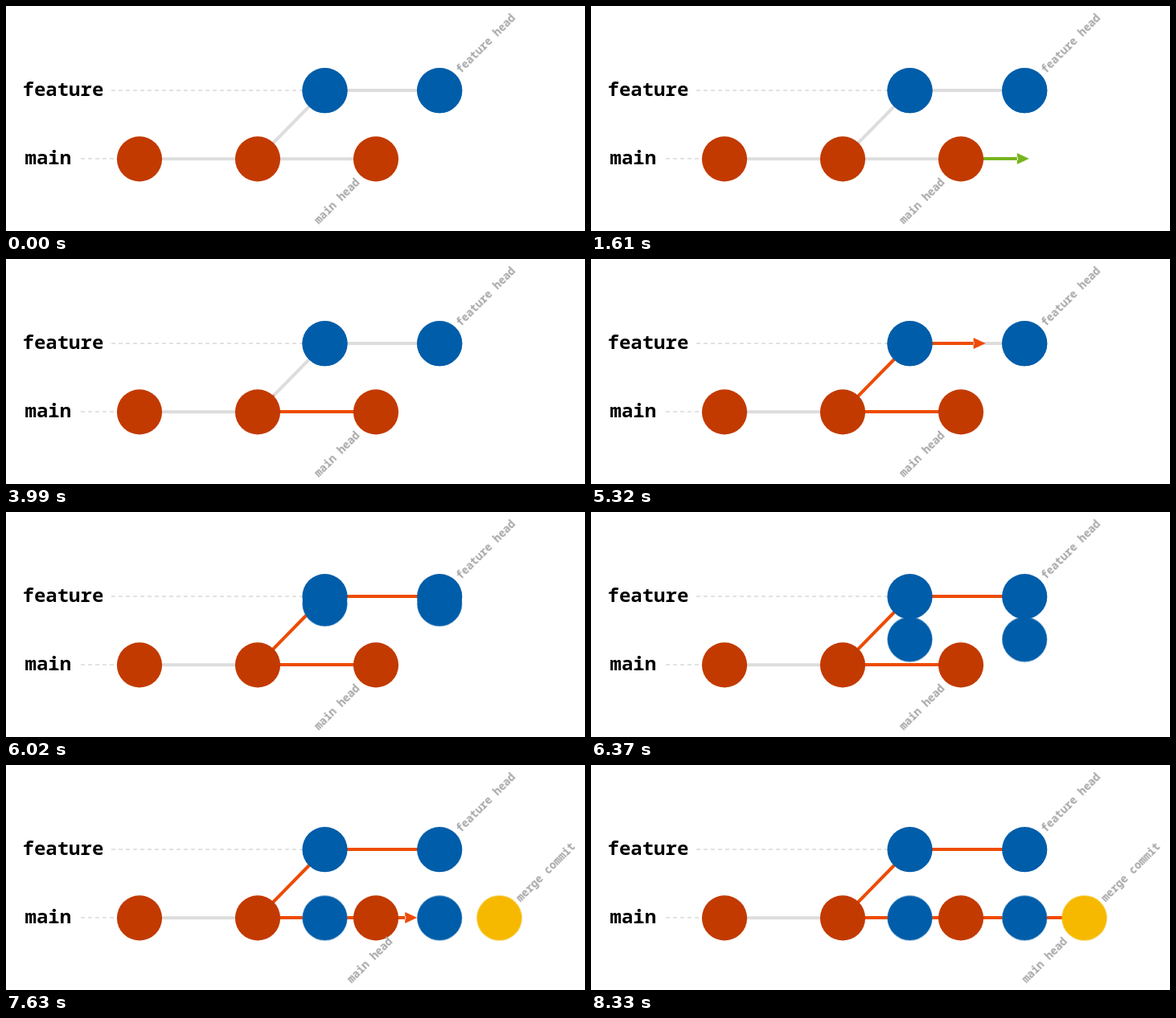
An HTML page for the animation above (8890 ms loop, 720x280 px).

```html
<!DOCTYPE html>
<html lang="en">
<head>
<meta charset="utf-8">
<title>Merging a feature branch</title>
<style>
  html, body { margin: 0; width: 100%; height: 100%; overflow: hidden; background: #fff; }
  body > svg { display: block; width: 720px; height: 280px; }

  text { font-family: "Noto Sans Mono", "DejaVu Sans Mono", monospace; }
  .branch { font-size: 24px; font-weight: 700; }
  .tag { font-size: 13.5px; font-weight: 600; fill: #a5a5a5; }
  .guide { stroke: #d9d9d9; stroke-width: 1.6; stroke-dasharray: 5 4; }
  .link { stroke: #ddd; stroke-width: 4; }
  .red { fill: #c23a00; }
  .blue { fill: #005da9; }
  .copy { stroke: #3f86c0; stroke-width: .5; }
  .yellow { fill: #f6b900; }
  .green { fill: #78b41e; }
  .orange { fill: #ee4b00; }

  /* One shared 8890 ms timeline, sought through --t */
  .anim { animation: 8890ms linear infinite paused both; animation-delay: calc(var(--t, 0) * -1ms); }
  .probe { animation-name: probe; }
  .main { animation-name: main; }
  .fork { animation-name: fork; }
  .feature { animation-name: feature; }
  .drop { animation-name: drop; }
  .merge { animation-name: merge; }
  .pop { animation-name: pop; }
  .show { animation-name: show; }
  .slide { animation-name: slide; }

  @keyframes probe {
    0% { transform: translateX(15px); }
    9.955% { transform: translateX(27px); animation-timing-function: cubic-bezier(.3, 0, .5, 1); }
    17.885% { transform: translateX(85px); animation-timing-function: ease-in-out; }
    23.285%, 100% { transform: translateX(15px); }
  }
  @keyframes main {
    0%, 32.34% { transform: translateX(28px); animation-timing-function: cubic-bezier(.4, 0, .4, 1); }
    40.1%, 100% { transform: translateX(136px); }
  }
  @keyframes fork {
    0%, 44.15% { transform: translateX(28px); animation-timing-function: cubic-bezier(.4, 0, .4, 1); }
    51.29%, 100% { transform: translateX(109px); }
  }
  @keyframes feature {
    0%, 55.96% { transform: translateX(28px); animation-timing-function: cubic-bezier(.4, 0, .4, 1); }
    63.72%, 100% { transform: translateX(131px); }
  }
  @keyframes drop {
    0%, 65.13% { transform: translateY(0); animation-timing-function: ease-in-out; }
    76.49%, 100% { transform: translateY(85.2px); }
  }
  @keyframes pop {
    0%, 76.38% { transform: scale(.3); opacity: 0; }
    82.68%, 100% { transform: scale(1); opacity: 1; }
  }
  @keyframes show {
    0%, 79.98% { opacity: 0; }
    84.93%, 100% { opacity: 1; }
  }
  @keyframes slide {
    0%, 81.55% { transform: translateX(0); animation-timing-function: ease-in-out; }
    93.48%, 100% { transform: translateX(152.5px); }
  }
  @keyframes merge {
    0%, 81.55% { transform: translateX(14px); animation-timing-function: ease-in-out; }
    93.48%, 100% { transform: translateX(153px); }
  }
</style>
</head>
<body>
<svg width="720" height="280" viewBox="0 0 720 280">
  <defs>
    <path id="arrow" d="M-200-2H-14V2H-200zM0 0L-15-7V7z"/>
    <circle id="dot" r="28.1"/>
  </defs>

  <text class="branch" x="20.5" y="111.5">feature</text>
  <text class="branch" x="23.5" y="197">main</text>
  <path class="guide" d="M131 105H368M93 190H138"/>
  <path class="link" fill="none" d="M166 190.2H460M313 190.2L396.5 105H539"/>

  <!-- Nested viewports clip each arrow's shaft at its starting commit -->
  <g transform="translate(460 190)">
    <svg y="-10" width="153" height="20" viewBox="0 -10 153 20">
      <use href="#arrow" class="anim green probe"/>
      <use href="#arrow" class="anim orange merge"/>
    </svg>
  </g>
  <g transform="translate(313 190)">
    <svg y="-10" width="147" height="20" viewBox="0 -10 147 20">
      <use href="#arrow" class="anim orange main"/>
    </svg>
  </g>
  <g transform="translate(313 190.2) rotate(-45.6)">
    <svg y="-10" width="119" height="20" viewBox="0 -10 119 20">
      <use href="#arrow" class="anim orange fork"/>
    </svg>
  </g>
  <g transform="translate(396.5 105)">
    <svg y="-10" width="142" height="20" viewBox="0 -10 142 20">
      <use href="#arrow" class="anim orange feature"/>
    </svg>
  </g>

  <g class="anim drop">
    <circle class="blue copy" cx="396.5" cy="105.2" r="27.8"/>
    <circle class="blue copy" cx="539.2" cy="105.2" r="27.8"/>
  </g>
  <g class="blue">
    <use href="#dot" x="396.5" y="105.2"/>
    <use href="#dot" x="539.2" y="105.2"/>
  </g>
  <g class="red">
    <use href="#dot" x="166" y="190.4"/>
    <use href="#dot" x="313" y="190.4"/>
    <use href="#dot" x="460" y="190.4"/>
  </g>
  <g transform="translate(613.5 190.4)">
    <use href="#dot" class="anim yellow pop"/>
  </g>

  <text class="tag" transform="translate(565.5 84.5) rotate(-45)">feature head</text>
  <text class="tag anim show" transform="translate(640 171) rotate(-45)">merge commit</text>
  <g class="anim slide">
    <text class="tag" transform="translate(389 272) rotate(-45)">main head</text>
  </g>
</svg>
<script>
  const LOOP = 8890, STEP = 70;
  const root = document.documentElement;

  // The motion advances in even 70 ms steps
  function tick() {
    const t = performance.now() % LOOP;
    root.style.setProperty('--t', Math.floor(t / STEP) * STEP);
    requestAnimationFrame(tick);
  }
  tick();
</script>
</body>
</html>
```
